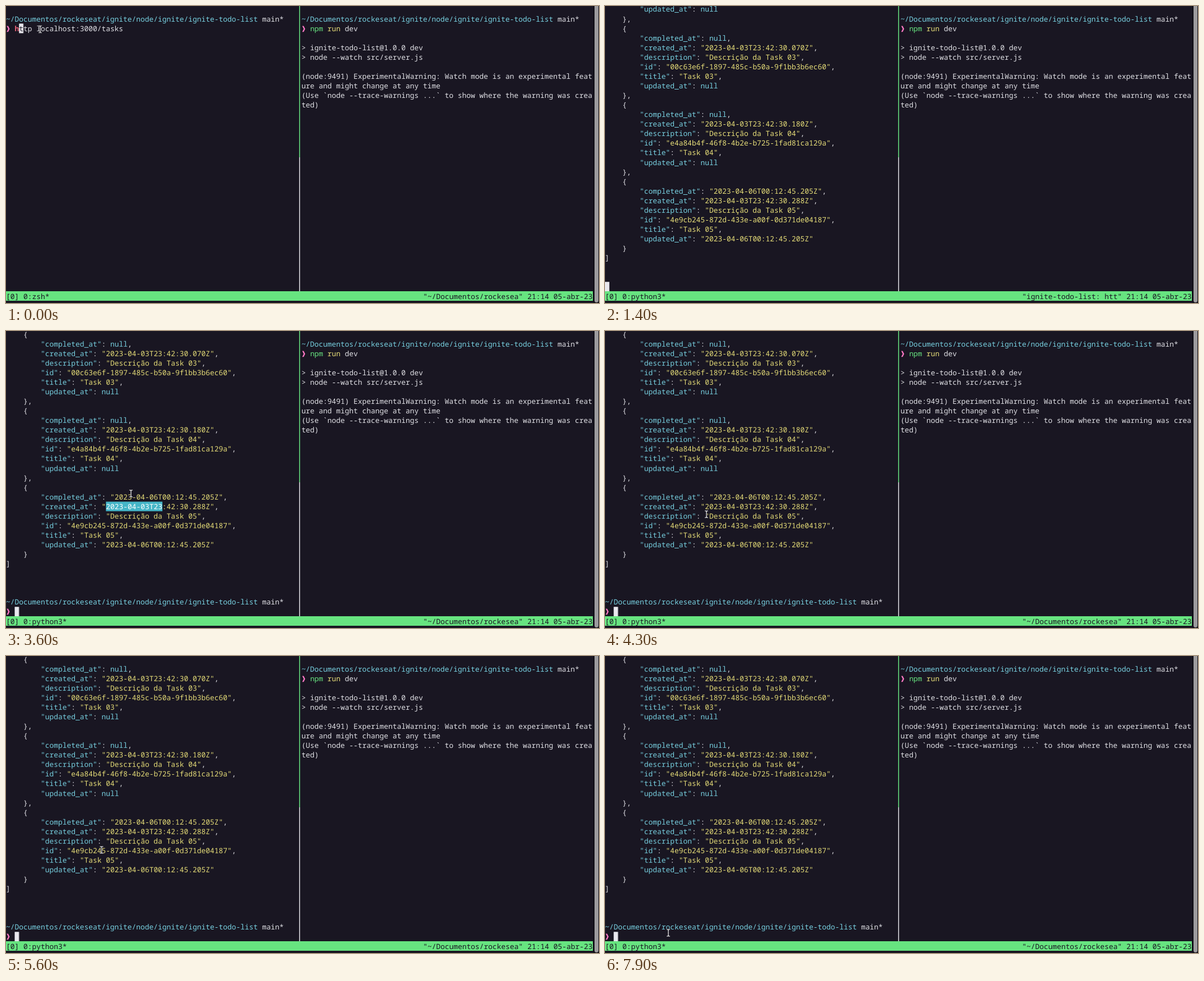
Write an HTML page that moves like this. It is 1058 px wide and 530 px high and loops after 8 s.

```html
<!DOCTYPE html>
<html lang="pt-BR">
<head>
<meta charset="utf-8">
<title>Terminal</title>
<style>
html, body { margin: 0; width: 100%; height: 100%; overflow: hidden; background: #191622; }
svg { display: block; }
text {
  font: 12.92px "Noto Sans Mono", "DejaVu Sans Mono", monospace;
  fill: #e1e1e6; white-space: pre; text-rendering: geometricPrecision;
  font-variant-ligatures: none;
}
.cyan { fill: #78d1e1; }
.yellow { fill: #e7de79; }
.green { fill: #67e480; }
.pink { fill: #ff79c6; font-family: "DejaVu Sans Mono", "DejaVu Sans", monospace; }
.red { fill: #e96379; font-weight: bold; }
.dark { fill: #191622; }
.sel { fill: #45b5c8; }
.sel ~ text { fill: #fff; }

/* Everything changes in hard steps on one 8 s clock. */
.anim { animation: 8s step-end infinite; }
#typing { animation-name: typing; }
#typed { animation-name: typed; }
#before { animation-name: before; }
#output { animation-name: output; }
#after { animation-name: after; }
#shell { animation-name: shell; }
#python { animation-name: python; }
#titleDir { animation-name: titleDir; }
#titleRun { animation-name: titleRun; }
#selDate { animation-name: selDate; }
#selId { animation-name: selId; }
#selLine { animation-name: selLine; }
#caret { animation-name: caret; }
#mouse { animation-name: mouse; }

@keyframes typing { 0% { opacity: 1 } 1.25%, 100% { opacity: 0 } }
@keyframes typed { 0% { opacity: 0 } 1.25%, 100% { opacity: 1 } }
@keyframes before { 0% { opacity: 1 } 17.5%, 100% { opacity: 0 } }
@keyframes output {
  0% { opacity: 0; transform: translateY(34.14px) }
  17.5% { opacity: 1; transform: translateY(34.14px) }
  18.75%, 100% { opacity: 1; transform: none }
}
@keyframes after { 0% { opacity: 0 } 18.75%, 100% { opacity: 1 } }
@keyframes shell { 0% { opacity: 1 } 11.25%, 100% { opacity: 0 } }
@keyframes python { 0% { opacity: 0 } 11.25%, 100% { opacity: 1 } }
@keyframes titleDir { 0% { opacity: 1 } 11.25% { opacity: 0 } 18.75%, 100% { opacity: 1 } }
@keyframes titleRun { 0% { opacity: 0 } 11.25% { opacity: 1 } 18.75%, 100% { opacity: 0 } }
@keyframes selDate { 0% { opacity: 0 } 40% { opacity: 1 } 47.5%, 100% { opacity: 0 } }
@keyframes selId {
  0% { opacity: 0 } 62.5% { opacity: 1 } 65% { opacity: 0 }
  73.75% { opacity: 1 } 91.25%, 100% { opacity: 0 }
}
@keyframes selLine { 0% { opacity: 0 } 65% { opacity: 1 } 70%, 100% { opacity: 0 } }
@keyframes caret {
  0% { transform: translate(23.26px, 31.4px) }
  1.25% { transform: translate(209.3px, 31.4px) }
  11.25% { transform: translate(0, 48.47px) }
  17.5% { transform: translate(0, 492.29px) }
  18.75%, 100% { transform: translate(15.5px, 492.29px) }
}
@keyframes mouse {
  0% { opacity: 1; transform: translate(61px, 41.5px) }
  1.25% { opacity: 0; transform: translate(61px, 41.5px) }
  21.25% { opacity: 1; transform: translate(59px, 51px) }
  22.5% { opacity: 1; transform: translate(50px, 85px) }
  23.75% { transform: translate(46px, 130px) }
  25% { transform: translate(62px, 180px) }
  26.25% { transform: translate(90.5px, 226px) }
  28.75% { transform: translate(167px, 270px) }
  30% { transform: translate(205px, 300px) }
  31.25% { transform: translate(223px, 313px) }
  37.5% { transform: translate(230px, 311px) }
  45% { transform: translate(223px, 290px) }
  46.25% { transform: translate(219px, 285px) }
  47.5% { transform: translate(216px, 283px) }
  50% { transform: translate(214px, 290px) }
  51.25% { transform: translate(205px, 305px) }
  52.5% { transform: translate(188px, 321px) }
  53.75% { transform: translate(181px, 327px) }
  56.25% { transform: translate(203px, 336px) }
  60% { transform: translate(172px, 346px) }
  65% { transform: translate(170.5px, 346px) }
  85% { transform: translate(165px, 372px) }
  86.25% { transform: translate(142px, 428px) }
  87.5% { transform: translate(116px, 474px) }
  88.75% { transform: translate(105px, 490px) }
  95% { transform: translate(104px, 494px) }
  96.25% { transform: translate(105px, 498px) }
  97.5% { transform: translate(109px, 499px) }
  98.75%, 100% { opacity: 1; transform: translate(113px, 494px) }
}
</style>
</head>
<body>
<svg width="1058" height="530" viewBox="0 0 1058 530">
  <defs><path id="beam" d="M-3-6H-1L0-5 1-6H3M0-5V5M-3 6H-1L0 5 1 6H3"/></defs>
  <rect width="1058" height="530" fill="#191622"/>
  <rect id="caret" class="anim" width="7.75" height="17.07" fill="#e9e8ee"/>
  <g id="before" class="anim">
    <g id="typing" class="anim"></g>
    <g id="typed" class="anim"></g>
  </g>
  <g id="output" class="anim"></g>
  <g id="after" class="anim"></g>
  <g id="server"></g>
  <g id="selDate" class="anim"></g>
  <g id="selId" class="anim"></g>
  <g id="selLine" class="anim"></g>
  <rect x="523" width="1.5" height="270" fill="#67e480"/>
  <rect x="523" y="270" width="1.5" height="239" fill="#e1e1e6"/>
  <rect y="509" width="1047" height="17" fill="#67e480"/>
  <g id="shell" class="anim"></g>
  <g id="python" class="anim"></g>
  <g id="titleDir" class="anim"></g>
  <g id="titleRun" class="anim"></g>
  <g id="status"></g>
  <rect x="1048" width="10" height="530" fill="#0f0d15"/>
  <rect x="1050" y="-10" width="7" height="539" rx="3.5" fill="#9c9b9e"/>
  <g id="mouse" class="anim" fill="none" stroke-linejoin="round">
    <use href="#beam" stroke="#15121c" stroke-width="2.4"/>
    <use href="#beam" stroke="#fff" stroke-width="1.2"/>
  </g>
</svg>
<script>
const CELL = 7.752, LINE = 17.07, TOP = -2.74, BASE = 13.2;
const RIGHT = 68, DIR = "~/Documentos/rockeseat/ignite/node/ignite/ignite-todo-list";
const $ = id => document.getElementById(id);

function add(parent, tag, attrs, text = "") {
  const el = document.createElementNS("http://www.w3.org/2000/svg", tag);
  for (const key in attrs) el.setAttribute(key, attrs[key]);
  el.textContent = text;
  parent.appendChild(el);
  return el;
}

// Each part is plain text or [class, text].
function put(id, row, col, ...parts) {
  const line = add($(id), "text", { x: col * CELL, y: TOP + row * LINE + BASE });
  for (const part of parts) {
    const [cls, str] = Array.isArray(part) ? part : ["", part];
    add(line, "tspan", cls ? { class: cls } : {}, str);
  }
}

function prompt(id, row, col = 0) {
  put(id, row, col, ["cyan", DIR], " main*");
  put(id, row + 1, col, ["pink", "❱"]);
}

function select(id, row, col, cells, at, str) {
  add($(id), "rect", { class: "sel", x: col * CELL, y: TOP + row * LINE, width: cells * CELL, height: LINE });
  put(id, row, at, str);
}

function field(row, key, value, last) {
  const val = value ? ["yellow", `"${value}"`] : ["cyan", "null"];
  put("output", row, 8, ["cyan", `"${key}"`], ": ", val, last ? "" : ",");
}

function task(row, num, millis, id, done, last) {
  put("output", row, 4, "{");
  field(row + 1, "completed_at", done);
  field(row + 2, "created_at", `2023-04-03T23:42:30.${millis}Z`);
  field(row + 3, "description", `Descrição da Task ${num}`);
  field(row + 4, "id", id);
  field(row + 5, "title", `Task ${num}`);
  field(row + 6, "updated_at", done, true);
  put("output", row + 7, 4, last ? "}" : "},");
}

prompt("before", 1);
put("typing", 2, 2, ["red", "h"], ["dark", "t"], "tp localhost:3000/tasks");
put("typed", 2, 2, ["green", "http"], " localhost:3000/tasks");

const lastId = "4e9cb245-872d-433e-a00f-0d371de04187";
field(-2, "updated_at", null, true);
put("output", -1, 4, "},");
task(0, "03", "070", "00c63e6f-1897-485c-b50a-9f1bb3b6ec60");
task(8, "04", "180", "e4a84b4f-46f8-4b2e-b725-1fad81ca129a");
task(16, "05", "288", lastId, "2023-04-06T00:12:45.205Z", true);
put("output", 24, 0, "]");
prompt("after", 28);

prompt("server", 1, RIGHT);
put("server", 2, RIGHT + 2, ["green", "npm"], " ", ["yellow", "run"], " dev");
[
  [4, "> ignite-todo-list@1.0.0 dev"],
  [5, "> node --watch src/server.js"],
  [7, "(node:9491) ExperimentalWarning: Watch mode is an experimental feat"],
  [8, "ure and might change at any time"],
  [9, "(Use `node --trace-warnings ...` to show where the warning was crea"],
  [10, "ted)"]
].forEach(([row, str]) => put("server", row, RIGHT, str));

select("selDate", 18, 23, 13, 23, "2023-04-03T23");
select("selId", 20, 15, 36, 15, lastId);
select("selLine", 20, 0, 135, 8, `"id": "${lastId}",`);

put("shell", 30, 0, ["dark", "[0] 0:zsh*"]);
put("python", 30, 0, ["dark", "[0] 0:python3*"]);
put("titleDir", 30, 96, ["dark", '"~/Documentos/rockesea"']);
put("titleRun", 30, 96, ["dark", '"ignite-todo-list: htt"']);
put("status", 30, 120, ["dark", "21:14 05-abr-23"]);
</script>
</body>
</html>
```
